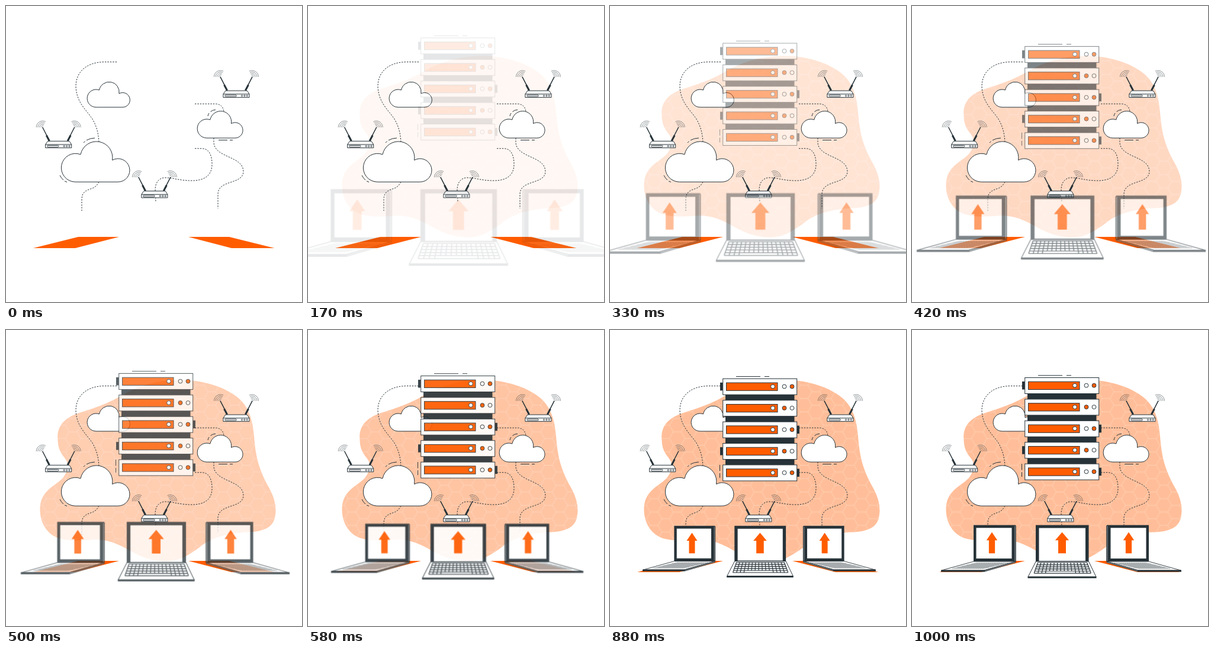
Write an HTML page that moves like this. It is 500 px wide and 500 px high and loops after 1040 ms.

```html
<!DOCTYPE html>
<html lang="en">
<head>
<meta charset="utf-8">
<title>Server network</title>
<style>
  @property --p { syntax: '<number>'; inherits: true; initial-value: 0; }

  html, body { margin: 0; width: 100%; height: 100%; overflow: hidden; background: #fff; }
  .ink { fill: #263238; }
  .paper { fill: #fff; stroke: #263238; }
  .hot { fill: #ff5c00; }
  .line { fill: none; stroke: #263238; }
  .dash { fill: none; stroke: #263238; stroke-dasharray: 2.4 2; }

  /* The clock below moves the delay, so the motion holds at 24 frames a second. */
  svg {
    display: block; width: 100vw; height: 100vh;
    animation: enter 1s cubic-bezier(.36, -.01, .5, 1.38) calc(var(--t, 0) * -1ms) both paused;
  }
  @keyframes enter { from { --p: 0; } to { --p: 1; } }

  .fade, .drop, .zoom { opacity: var(--p); }
  .drop { transform: translateY(calc((var(--p) - 1) * 30px)); }
  .zoom { transform: scale(calc(1.5 - .5 * var(--p))); transform-origin: 252px 375px; }
</style>
</head>
<body>
<svg viewBox="0 0 500 500">
  <defs>
    <pattern id="hex" width="39" height="22.56" patternUnits="userSpaceOnUse" patternTransform="translate(334.5 127)">
      <path d="M0 11.28L6.5 0H19.5L26 11.28L19.5 22.56H6.5ZM26 11.28H39" fill="none" stroke="#fff" stroke-width=".7" opacity=".4"/>
    </pattern>

    <path id="blob" d="M87.500 186C85 161 100 147 128 138.500C152 131 172 124 191 113C222 94 262 82 305 84.500C345 87 378 101 396 118C415 137 418 163 420 190C423 222 431 242 443 264C454 283 457 299 455 312C452.500 336 432 341.500 400 342C368 345 348 352 332 363C318 374 308 380 298 385C282 393 256 392 236 385C212 377 196 362 172 356.500C145 350 124 360 94 353C67 347 57 322 57.500 302C58 280 70 270 84 260C99 250 104 240 104 228C104 215 88 212 87.500 186Z"/>

    <path id="cloud" class="paper" vector-effect="non-scaling-stroke" d="M152 171A15 15 0 1 1 157.500 142A17.020 17.020 0 0 1 191 148A12.300 12.300 0 1 1 197 171Z"/>

    <g id="half">
      <path class="line" d="M61.500 204.500L69.500 220" stroke-width="1.500"/>
      <path class="line" d="M68.300 218.500L73.300 228" stroke-width="3"/>
      <path class="line" stroke-width=".7" opacity=".75" d="M59 205A3 3 0 0 1 63.400 202.300M56.500 205A5.500 5.500 0 0 1 64.500 200.100M53.800 205A8.200 8.200 0 0 1 65.700 197.700M51.200 205A10.800 10.800 0 0 1 66.900 195.400"/>
    </g>
    <g id="router">
      <use href="#half"/>
      <use href="#half" transform="matrix(-1 0 0 1 177.400 0)"/>
      <path class="paper" d="M70.500 228.300H107L110.700 234V239.600H66.600V234Z"/>
      <path class="line" d="M66.600 234H110.700"/>
      <rect class="paper" x="69.500" y="235.500" width="19.500" height="2.600" rx="1.300" stroke-width=".9"/>
      <g class="paper" stroke-width=".9">
        <circle cx="98.200" cy="236.800" r="1.150"/>
        <circle cx="102.600" cy="236.800" r="1.150"/>
        <circle cx="107" cy="236.800" r="1.150"/>
      </g>
    </g>

    <g id="side">
      <path class="paper" d="M104 391H175L122 406H50Z" stroke-width=".9"/>
      <path class="line keys" data-quad="108 393.300 163 393.300 122 403 68 403" stroke-width=".4" opacity=".7"/>
      <path class="ink" d="M49 405.500H122L175.300 390.500V393L122.500 408.600H49Z"/>
      <path d="M123 406.900L174.500 392" fill="none" stroke="#fff" stroke-width=".5"/>
      <path class="ink" d="M104 329.500H174.800L175.800 331V391H104Z"/>
      <path d="M174 331V390" stroke="#fff" stroke-width=".5"/>
      <path fill="#fff" d="M108.500 334.300H168.500V386H108.500Z"/>
    </g>
    <path id="arrow" class="hot" d="M0 341.500L11.700 355.300H6.500V377.200H-6.500V355.300H-11.700Z"/>
  </defs>

  <g class="fade">
    <use href="#blob" fill="#ffbe99"/>
    <use href="#blob" fill="url(#hex)"/>
  </g>

  <g class="dash">
    <path d="M187 94.500H166C134 95 118 113 118 136C119 163 136 176 146 191C153 203 156 214 157 230"/>
    <path d="M157 297C150 311 141 307 133 314C129 317 128 322 128 328V346"/>
    <path d="M319 165.300H354Q367 166 368.300 180"/>
    <path d="M351 223V231C353 257 401 253 401 280C400 302 358 293 358 318V342"/>
    <path d="M319 240.700H331C344 241 348 254 348 267C348 288 333 295 314 295C292 295 283 290 268 290C256 291 252 301 252 311L253 331"/>
  </g>

  <use href="#cloud"/>
  <use href="#cloud" transform="translate(-126 23.600) scale(1.600)"/>
  <use href="#cloud" transform="translate(177.100 40.900) scale(1.065)"/>
  <g class="line">
    <path d="M131 231L133.500 228.500M136 226.800Q142 223.200 150 223"/>
    <path d="M91 286Q93.500 291 97 294M99 295.800L103 297.500"/>
    <path d="M341 186Q341.500 183 343 181M345.500 178.500Q349 175.500 354 175.300"/>
    <path d="M359 226.500H374M378 226.500H383"/>
  </g>

  <use href="#router"/>
  <use href="#router" x="300.300" y="-85.200"/>
  <use href="#router" x="162.200" y="84.300"/>

  <path class="hot" d="M122 390H191L117 409H46ZM308 390H377L453.500 409H381Z"/>

  <g id="server" class="drop">
    <path class="line" d="M213 76.800H254M261 76.800H269M185.500 226V236.500M185.500 240V248"/>
    <path class="ink" d="M195 100H311.500V235H195Z"/>
  </g>

  <g class="zoom">
    <use href="#side"/>
    <use href="#side" transform="matrix(-1 0 0 1 504 0)"/>
    <path class="paper" d="M209.300 391H298.500L311 417H196Z"/>
    <path class="line keys" data-quad="212.400 393 295.700 393 302.300 410.800 206.200 410.800" data-space="1" stroke-width="1.200"/>
    <path class="ink" d="M195.500 416.500H311.500V419.300H195.500Z"/>
    <path class="ink" d="M209 329.500H298.500V391H209Z"/>
    <path fill="#fff" d="M214.500 334.500H293V390H214.500Z"/>
    <use href="#arrow" x="253.500"/>
    <use href="#arrow" transform="translate(135 0) scale(.79 1)"/>
    <use href="#arrow" transform="translate(366 0) scale(.79 1)"/>
  </g>
</svg>
<script>
  const LOOP = 1040, ROWS = 5, COLS = 15;

  function unit(i) {
    const y = 80.5 + 36.4 * i;
    const tabX = [186, , 315.5, 186, 315.5][i];
    const tab = tabX ? `<rect class="ink" x="${tabX}" y="${y + 6.5}" width="4.5" height="13.5"/>` : '';
    const dot = (x, fill) => `<circle cx="${x}" cy="${y + 13.2}" r="3.4" style="fill:${fill}"/>`;
    const lamps = i % 2 ? ['#ff5c00', '#fff'] : ['#fff', '#ff5c00'];
    return `${tab}<g class="paper"><rect x="190.700" y="${y}" width="125" height="27"/>
      <rect x="196.500" y="${y + 6.8}" width="86.500" height="13.200" style="fill:#ff5c00"/>
      ${dot(275, '#fff')}${dot(294.5, lamps[0])}${dot(307.5, lamps[1])}</g>`;
  }
  document.getElementById('server').insertAdjacentHTML('beforeend', [0, 1, 2, 3, 4].map(unit).join(''));

  // Key grid inside a four-sided area; the space bar leaves a gap in the last row.
  function keyGrid(el) {
    const [ax, ay, bx, by, cx, cy, dx, dy] = el.dataset.quad.split(' ').map(Number);
    const mix = (a, b, k) => a + (b - a) * k;
    const at = (u, v) => [
      mix(mix(ax, bx, u), mix(dx, cx, u), v),
      mix(mix(ay, by, u), mix(dy, cy, u), v)
    ].map(n => n.toFixed(2)).join(' ');
    let d = '';
    for (let r = 0; r <= ROWS; r++) d += `M${at(0, r / ROWS)}L${at(1, r / ROWS)}`;
    for (let c = 0; c <= COLS; c++) {
      const inSpace = el.dataset.space && c > 3 && c < 11;
      d += `M${at(c / COLS, 0)}L${at(c / COLS, inSpace ? 1 - 1 / ROWS : 1)}`;
    }
    el.setAttribute('d', d);
  }
  document.querySelectorAll('.keys').forEach(keyGrid);

  const start = performance.now();
  function tick() {
    const t = (performance.now() - start) % LOOP;
    const step = Math.ceil((Math.floor(t / 10) + .5) * 24 / 100) - 1;
    document.documentElement.style.setProperty('--t', step * 1000 / 24 + 10);
    requestAnimationFrame(tick);
  }
  tick();
</script>
</body>
</html>
```
